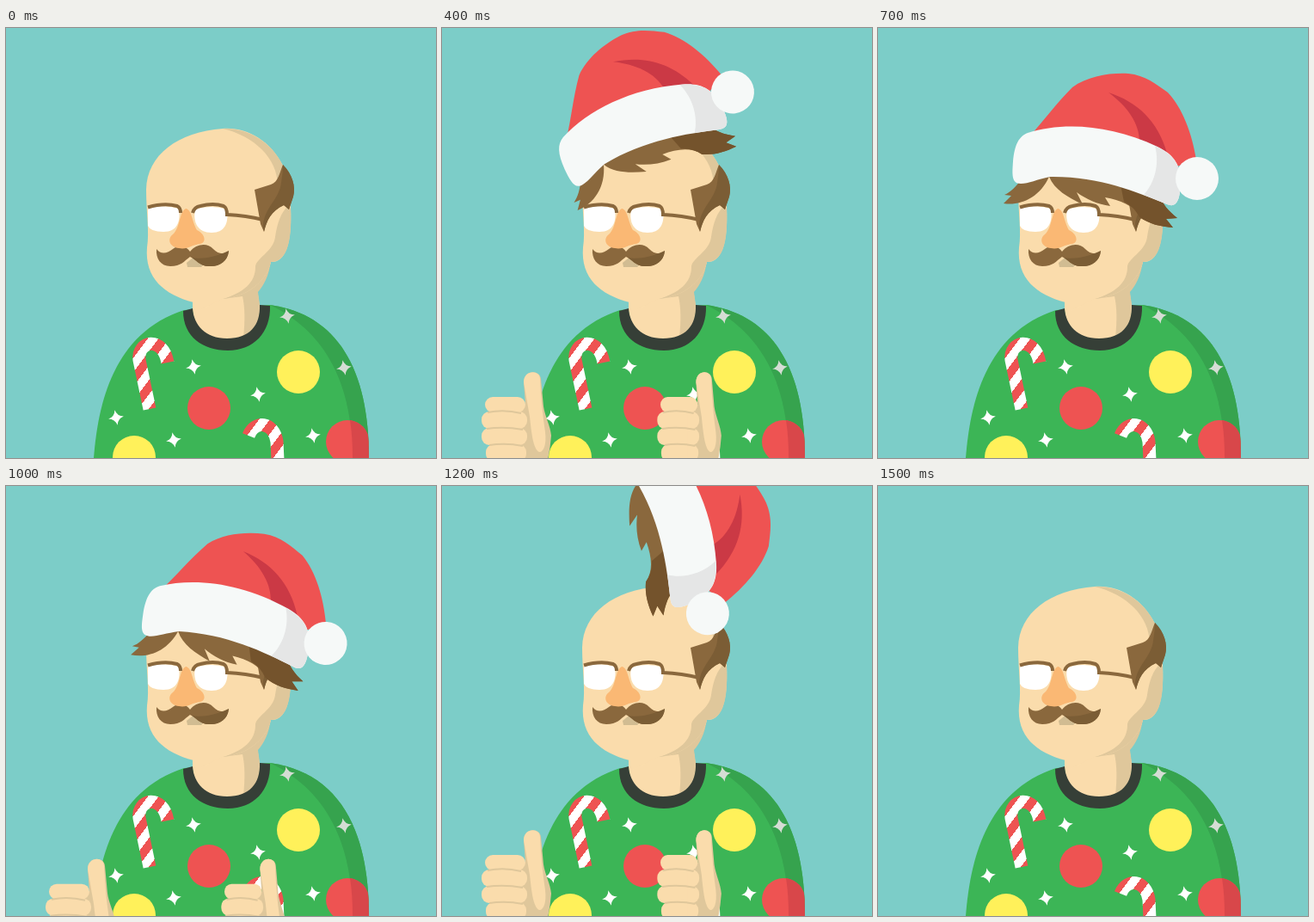
An HTML page for the animation above (1600 ms loop, 500 px wide and 500 px high).

```html
<!DOCTYPE html>
<html lang="en">
<head>
<meta charset="utf-8">
<title>Festive thumbs up</title>
<style>
  html, body { margin: 0; width: 100%; height: 100%; overflow: hidden; background: #7ccdc8; }
  svg { display: block; width: 100%; height: 100%; }
  .skin { fill: #fadcac; } .skin-shade { fill: #dfc79b; }
  .hair { fill: #8a683d; } .hair-shade { fill: #7b5d35; }
  .red { fill: #ee5352; } .yellow { fill: #fff15a; } .white { fill: #f6f9f8; }
  .line { fill: none; stroke: #8a683d; stroke-width: 4; }
  .cane { fill: none; stroke: url(#stripes); stroke-width: 15; }
</style>
</head>
<body>
<svg viewBox="0 0 500 500">
  <defs>
    <linearGradient id="stripes" gradientUnits="userSpaceOnUse" x1="160" y1="351" x2="176" y2="363" spreadMethod="repeat">
      <stop offset="0" stop-color="#ee5352"/><stop offset=".5" stop-color="#ee5352"/>
      <stop offset=".5" stop-color="#fff"/><stop offset="1" stop-color="#fff"/>
    </linearGradient>
    <path id="torso" d="M102 500C107 438 124 355 207 328L307 322C385 333 422 396 422 500Z"/>
    <clipPath id="torsoClip"><use href="#torso"/></clipPath>
    <path id="star" d="M0-9Q1.5-1.5 9 0Q1.5 1.5 0 9Q-1.5 1.5-9 0Q-1.5-1.5 0-9Z" transform="rotate(-10)"/>
    <g id="hand">
      <path class="skin-shade" d="M60 434L97 438L95 412C95 397 114 397 115 408L118 440C120 453 126 462 127 474Q126 488 123 502H58Z"/>
      <path class="skin" d="M95 412C95 397 114 397 114 408C115 430 117 450 120 470C122 486 117 494 113 493C106 490 104 470 102 452Z"/>
      <g class="skin">
        <rect x="50" y="429" width="47" height="18" rx="9"/>
        <rect x="46" y="446" width="53" height="20" rx="9"/>
        <rect x="46" y="465" width="53" height="20" rx="9"/>
        <rect x="51" y="484" width="47" height="20" rx="9"/>
        <path d="M60 431H88V446H60ZM60 448H84V500H60Z"/>
      </g>
      <path d="M53 447Q72 443 92 448M52 466Q72 463 94 467M55 485Q74 482 94 486" fill="none" stroke="#dfc79b" stroke-width="2"/>
    </g>
  </defs>

  <rect width="500" height="500" fill="#7ccdc8"/>

  <!-- sweater -->
  <use href="#torso" fill="#3cb556"/>
  <g clip-path="url(#torsoClip)">
    <path d="M307 322C365 350 403 405 403 500H430V322Z" fill="#36a34e"/>
    <circle class="yellow" cx="340" cy="400" r="25"/>
    <circle class="yellow" cx="149" cy="499" r="25"/>
    <circle class="red" cx="236" cy="442" r="25"/>
    <circle class="red" cx="397" cy="481" r="25"/>
    <path d="M400 456A25 25 0 0 1 422 481V500H403Q403 475 400 456Z" fill="#d8474a"/>
    <path class="cane" d="M167 443L155 386C152 364 182 357 188 389"/>
    <path class="cane" d="M316 503L315 481C311 457 289 456 282 474"/>
    <g fill="#fff" id="stars"></g>
    <g fill="#d5ddd4">
      <use href="#star" x="327" y="335"/>
      <use href="#star" x="393" y="395"/>
    </g>
  </g>

  <!-- neck and collar -->
  <path class="skin" d="M217 310H293L295 324C296 346 283 362 257 362C232 362 217 346 217 326Z"/>
  <path class="skin-shade" d="M252 315L308 270C306 289 299 300 293 307L295 322C296 342 289 355 276 360C278 342 278 325 275 312Z"/>
  <path d="M206 329C206 359 229 375 258 375C288 375 308 354 307 323L295 322C296 346 283 361 257 361C232 361 218 345 217 326Z" fill="#363f37"/>

  <!-- head -->
  <path class="skin" d="M252 117C200 121 164 147 163 188C163 214 167 238 164 255C161 291 184 310 218 319Q220 323 221 330L252 315C282 312 303 294 308 272C323 273 333 256 331 207L322 160C307 130 279 115 252 117Z"/>
  <path class="skin-shade" d="M252 117C282 116 310 133 323 162L316 182C315 151 289 126 252 117Z"/>
  <path class="skin-shade" d="M329 206C320 213 315 228 313 243C311 260 290 268 290 278C290 296 276 308 252 315C282 312 303 294 308 272C324 272 333 255 331 211Z"/>
  <path class="hair" d="M289 188L308 182C317 179 318 168 322 159C333 170 337 184 334 196L329 211L323 206C308 213 303 224 300 237L296 228Z"/>
  <path class="hair-shade" d="M322 159C333 170 337 184 334 196L329 211L323 206C308 213 303 224 300 237L299 230C300 209 318 199 320 180Q322 169 322 159Z"/>

  <!-- face -->
  <path d="M165 209Q184 205 201 210C203 224 200 237 183 237Q168 237 165 230Z" fill="#fff"/>
  <path d="M220 211Q238 205 257 211C259 226 255 238 239 238C223 238 217 226 220 211Z" fill="#fff"/>
  <path class="line" d="M165 208.500Q184 203 199 207Q203 209 203 215M217 215Q219 208 226 207Q241 203 253 207Q257 209 257 217Q279 218 299 223"/>
  <path fill="#d1bc92" d="M210 273L220 265L232 273L227 278H211Z"/>
  <path class="hair" d="M175 257C180 264 188 262 194 257C202 251 210 254 214 260C221 251 234 249 241 257C247 263 254 264 259 259C258 272 247 278 236 277C225 277 221 269 214 266C207 271 204 277 191 277C180 277 174 268 175 257Z"/>
  <path class="hair-shade" d="M214 266C224 270 242 267 259 259C258 272 247 278 236 277C225 277 221 269 214 266Z"/>
  <path fill="#fab874" d="M209 210C216 211 216 224 222 235C231 239 234 249 226 251C216 252 211 258 201 256C190 255 187 245 194 240C203 232 201 214 209 210Z"/>

  <g id="hands">
    <use href="#hand"/>
    <use href="#hand" transform="translate(208 0) scale(.92 1)"/>
  </g>

  <!-- hat, drawn in its worn position -->
  <g id="hat">
    <path class="hair" d="M168 174C161 184 154 191 147 194L155 195L146 204C166 207 188 197 199 173C205 188 221 197 238 205L231 191C242 199 255 205 270 207L264 197C282 200 297 206 304 220C316 228 328 231 343 232L335 222L348 221C337 212 331 205 328 195L270 168Z"/>
    <path d="M282 182L286 202Q298 208 304 220C316 228 328 231 343 232L335 222L348 221C337 212 331 205 328 195Z" fill="#74532c"/>
    <path class="red" d="M176 126C193 108 206 89 226 69C244 56 269 52 291 53C311 55 323 65 337 75C354 93 365 122 370 153L345 162Z"/>
    <path d="M268 75C302 86 325 108 336 145L304 132C304 111 290 91 268 75Z" fill="#cb3945"/>
    <path class="white" d="M174 122C215 109 270 112 325 138C346 148 352 161 352 180C351 203 346 209 336 205C300 190 255 172 200 173C185 176 175 181 166 181C155 181 156 170 157 155C159 135 164 126 174 122Z"/>
    <path d="M322 137C346 148 352 161 352 180C351 203 346 209 336 205L309 194C321 181 328 159 322 137Z" fill="#e5e6e6"/>
    <circle class="white" cx="371" cy="175" r="25"/>
  </g>
</svg>
<script>
  const STEP = 100, STEPS = 16;
  // Hat poses per step: centre x, centre y, angle
  const away = [214, -260, -120], worn = [255, 130, 0], dip = [255, 134, 0];
  const hatPoses = [
    away, away, [214, -62, -90], [213, 22, -60], [215, 93.5, -30], [248, 132, -4], dip, worn,
    worn, dip, [259, 130, 4], [276, 112, 30], [292, 25, 61], [300, -93, 93], away, away
  ];
  const hat = document.getElementById('hat');
  const hands = document.getElementById('hands');

  document.getElementById('stars').innerHTML =
    [[218, 394], [293, 426], [128, 453], [195, 479], [357, 474]]
      .map(([x, y]) => `<use href="#star" x="${x}" y="${y}"/>`).join('');

  function draw(now) {
    const step = Math.floor(now / STEP) % STEPS;
    const [x, y, angle] = hatPoses[step];
    hat.setAttribute('transform', `translate(${x} ${y}) rotate(${angle}) translate(-255 -130)`);

    // Hands rise for three steps, hold, and sink again, twice per loop
    const phase = step % 8;
    const lift = Math.min(phase, 7 - phase);
    hands.setAttribute('transform', `translate(0 ${101 - lift * 101 / 3})`);
    requestAnimationFrame(draw);
  }
  draw(0);
</script>
</body>
</html>
```
